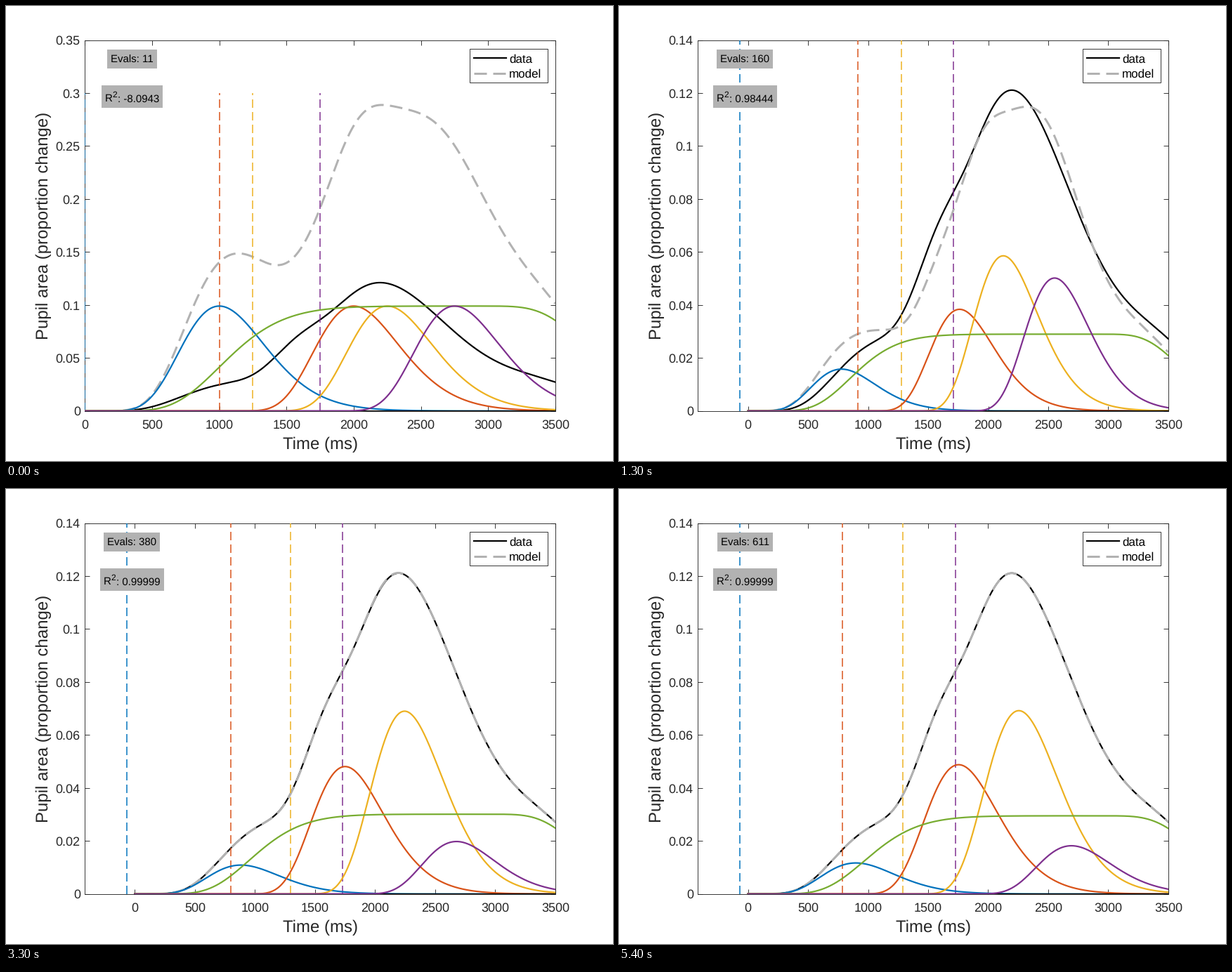
Animation of 864 by 648 pixels, one loop 5500 ms. Source, as a matplotlib script:

```python
import numpy as np
import matplotlib.pyplot as plt
from matplotlib.animation import FuncAnimation
from matplotlib.patches import Rectangle

W, H = 864, 648
FRAMES, INTERVAL = 55, 100
T = np.arange(0, 3501, 4.0)
SHAPE = 10.1
BOX_END = 2750
INK = "#262626"
GRAY = "#b2b2b2"
COLORS = ["#0072bd", "#d95319", "#edb120", "#7e2f8e", "#77ac30"]

# Fit state: four event times, time to peak, five amplitudes, 1 - R squared
KEYS = {
    0: [0, 1000, 1250, 1750, 1000, .099, .099, .099, .099, .099, 9.0943],
    9: [-206, 1008, 1238, 1699, 749, .0110, .0131, .0506, .0719, .0349, .05616],
    17: [15.7, 860, 1305, 1712, 904, .0187, .0537, .0634, .0370, .0254, .00714],
    23: [-44, 805, 1291, 1724, 935, .0114, .0475, .0690, .0242, .0292, .00014],
    33: [-66, 801, 1296, 1728, 949, .0109, .0481, .0690, .0198, .0301, .00001],
    47: [-67, 790, 1291, 1728, 963, .0116, .0487, .0692, .0184, .0296, .00001],
    54: [-67, 789, 1290, 1728, 965, .0117, .0488, .0692, .0182, .0295, .00001],
}


def state(k):
    """Fit parameters at step k, easing out between the key states."""
    times = list(KEYS)
    i = min(np.searchsorted(times, k, side="right"), len(times) - 1)
    t0, t1 = times[i - 1], times[i]
    rate = 2 if i == 1 else 1
    w = np.expm1(-rate * (k - t0) / (t1 - t0)) / np.expm1(-rate)
    a, b = np.array(KEYS[t0], float), np.array(KEYS[t1], float)
    p = a + (b - a) * w
    p[-1] = a[-1] * (b[-1] / a[-1]) ** w
    return p


def pulse(t, peak):
    u = np.maximum(t / peak, 1e-9)
    return np.exp(SHAPE * (np.log(u) + 1 - u))


def plateau(peak):
    fine = np.arange(0, 3501.0)
    area = np.cumsum(pulse(fine, peak))
    y = np.interp(T, fine, area) - np.interp(T - BOX_END, fine, area)
    return y / y.max()


def components(p):
    peak, amps = p[4], p[5:10]
    curves = [a * pulse(T - t0, peak) for a, t0 in zip(amps, p[:4])]
    return curves + [amps[4] * plateau(peak)]


plt.rcParams["font.family"] = "Liberation Sans"
plt.rcParams["text.hinting"] = "none"
plt.rcParams["text.hinting_factor"] = 1

fig = plt.figure(figsize=(W / 72, H / 72), dpi=72, facecolor="white")
ax = fig.add_axes([0.13, 0.11, 0.775, 0.815])
ax.tick_params(direction="in", top=True, right=True, length=6.7, width=0.9,
               color=INK, labelcolor=INK, labelsize=18.2)
ax.tick_params(axis="x", pad=24.7)
ax.tick_params(axis="y", pad=6.5)
for spine in ax.spines.values():
    spine.set(color=INK, linewidth=0.9)

data = sum(components(state(FRAMES - 1)))
ax.plot(T, data, color="black", lw=2.2, zorder=3)
model, = ax.plot([], [], color=GRAY, lw=3, ls=(0, (6, 3)), zorder=3.1)
parts = [ax.plot([], [], color=c, lw=2.2, zorder=z)[0]
         for c, z in zip(COLORS, (3.2, 3.3, 3.4, 3.7, 3.5))]
ax.plot([0, 3500], [0, 0], color="black", lw=2, zorder=3.6)
events = [ax.plot([], [], color=c, lw=1.5, ls=(0, (8, 4)), zorder=3.15)[0]
          for c in COLORS[:4]]

# Overlay in pixels, y pointing down
top = fig.add_axes([0, 0, 1, 1])
top.set(xlim=(0, W), ylim=(H, 0))
top.axis("off")


def label(x, y, s, size, color="black", ha="left", **kw):
    return top.text(x, y, s, fontsize=size, color=color, ha=ha,
                    va="baseline", **kw)


def panel(x, y, w, h, **kw):
    return top.add_patch(Rectangle((x, y), w, h, **kw))


label(447, 631, "Time (ms)", 24.4, INK, "center")
label(60, 312.7, "Pupil area (proportion change)", 24.4, INK, "center",
      rotation=90, rotation_mode="anchor")

panel(659.5, 60.5, 111, 48, fc="white", ec=INK, lw=0.9)
top.plot([666, 712], [74, 74], color="black", lw=2.2)
top.plot([666, 712], [95.5, 95.5], color=GRAY, lw=3, ls=(0, (6, 3)))
label(716, 81, "data", 16.8)
label(716, 102, "model", 16.8)

MID = 179.3
evals_box = panel(139, 62, 80, 27, fc=GRAY, ec="none")
evals = label(MID, 81.3, "", 15, ha="center")
r2_box = panel(134, 113, 92, 32, fc=GRAY, ec="none")
r2_base = label(0, 136.5, "R", 15)
r2_power = label(0, 129.5, "2", 12)
r2_value = label(0, 136.5, "", 15)


def fit_box(box, width):
    box.set_x(MID - width / 2 - 5)
    box.set_width(width + 10)


def set_readouts(k, err):
    extra = (4 if k >= 1 else 0) + (2 if k >= 13 else 0)
    evals.set_text(f"Evals: {11 * (k + 1) + extra}")
    fit_box(evals_box, evals.get_window_extent().width)

    r2_value.set_text(f": {1 - err:.5g}")
    lead = 18
    width = lead + r2_value.get_window_extent().width
    x = MID - width / 2
    r2_base.set_x(x)
    r2_power.set_x(x + 10.8)
    r2_value.set_x(x + lead)
    fit_box(r2_box, width)


def set_axes(first_event, peak):
    left = first_event - 350 if first_event < 0 else 0
    ax.set_xlim(left, 3500)
    ax.set_xticks(np.arange(np.ceil(left / 500) * 500, 3501, 500))
    for text in ax.get_xticklabels():
        text.set_va("baseline")

    step = 0.02 if peak <= 0.2 else 0.05
    line_top = np.ceil(peak / step) * step
    limit = line_top + step if line_top > 0.29 else line_top
    ax.set_ylim(0, limit)
    ticks = np.arange(0, limit + step / 2, step)
    ax.set_yticks(ticks, [f"{v:.2g}" for v in ticks])
    return line_top


def draw(k):
    p = state(k)
    curves = components(p)
    total = sum(curves)
    model.set_data(T, total)
    for line, y in zip(parts, curves):
        line.set_data(T, y)
    line_top = set_axes(p[0], max(total.max(), data.max()))
    for line, t0 in zip(events, p[:4]):
        line.set_data([t0, t0], [0, line_top])
    set_readouts(k, p[-1])
    return []


anim = FuncAnimation(fig, draw, frames=FRAMES, interval=INTERVAL,
                     repeat=True, blit=False)
plt.show()
```
